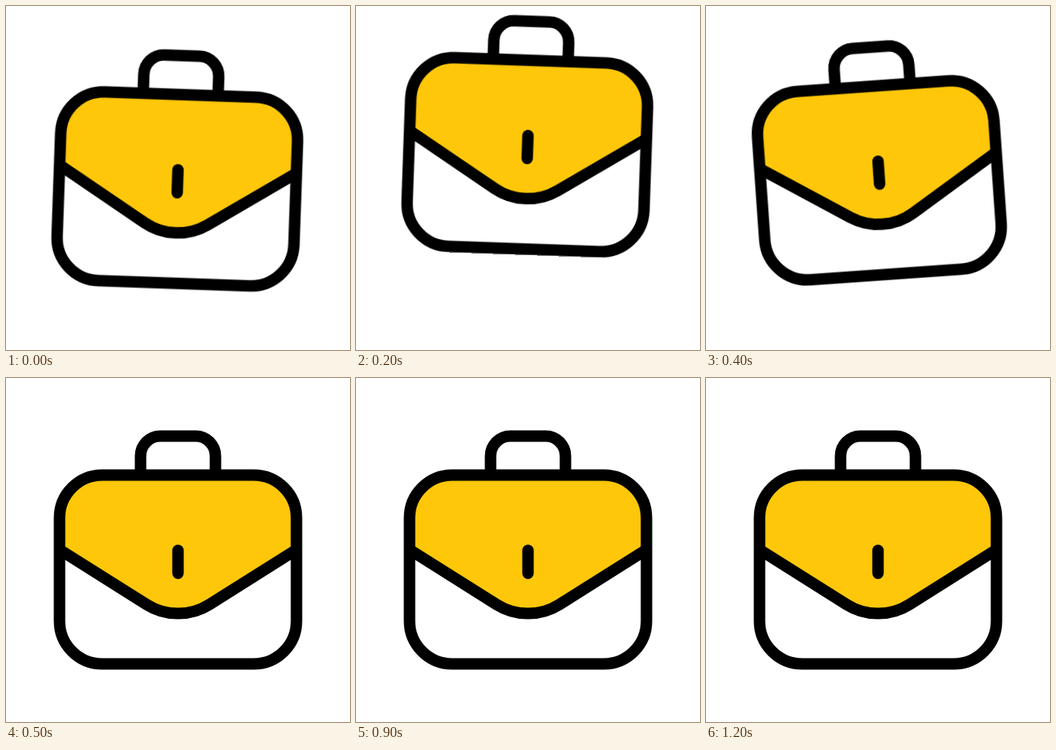
Recreate the animation shown at these times as an HTML page without scripts. Size 450x450 px, loop 1.3 s.

```html
<!DOCTYPE html>
<html lang="en">
<head>
<meta charset="utf-8">
<title>Hopping briefcase</title>
<style>
  html, body { margin: 0; width: 100%; height: 100%; overflow: hidden; background: #fff; }
  svg { display: block; width: 100vw; height: 100vh; }
  .line { fill: none; stroke: #000; stroke-width: 15; }
  .flap { fill: #fec709; }
  .latch { stroke-linecap: round; }

  /* Hop and tilt at ten poses a second; lift is 5.6px per degree of tilt. */
  .case {
    transform-origin: 225px 225px;
    animation: hop 1300ms -4ms step-end infinite;
  }
  @keyframes hop {
    0%       { transform: translateY(-11.2px) rotate(2deg); }
    7.6923%  { transform: translateY(-44.8px) rotate(8deg); }
    15.3846% { transform: translateY(-56px) rotate(2deg); }
    23.0769% { transform: translateY(-56px) rotate(-10deg); }
    30.7692% { transform: translateY(-22.4px) rotate(-4deg); }
    38.4615%, 100% { transform: none; }
  }
</style>
</head>
<body>
<svg viewBox="0 0 450 450">
  <g class="case">
    <path class="flap" d="M70 224.5L184 296.3A77 77 0 0 0 266 296.3L380 224.5V183A56 56 0 0 0 324 127H126A56 56 0 0 0 70 183Z"/>
    <path class="line" d="M70 224.5L184 296.3A77 77 0 0 0 266 296.3L380 224.5"/>
    <rect class="line" x="70" y="127" width="310" height="247" rx="56"/>
    <path class="line" d="M176 127V102A26 26 0 0 1 202 76H248A26 26 0 0 1 274 102V127"/>
    <path class="line latch" d="M225 225.5V255.5"/>
  </g>
</svg>
</body>
</html>
```
